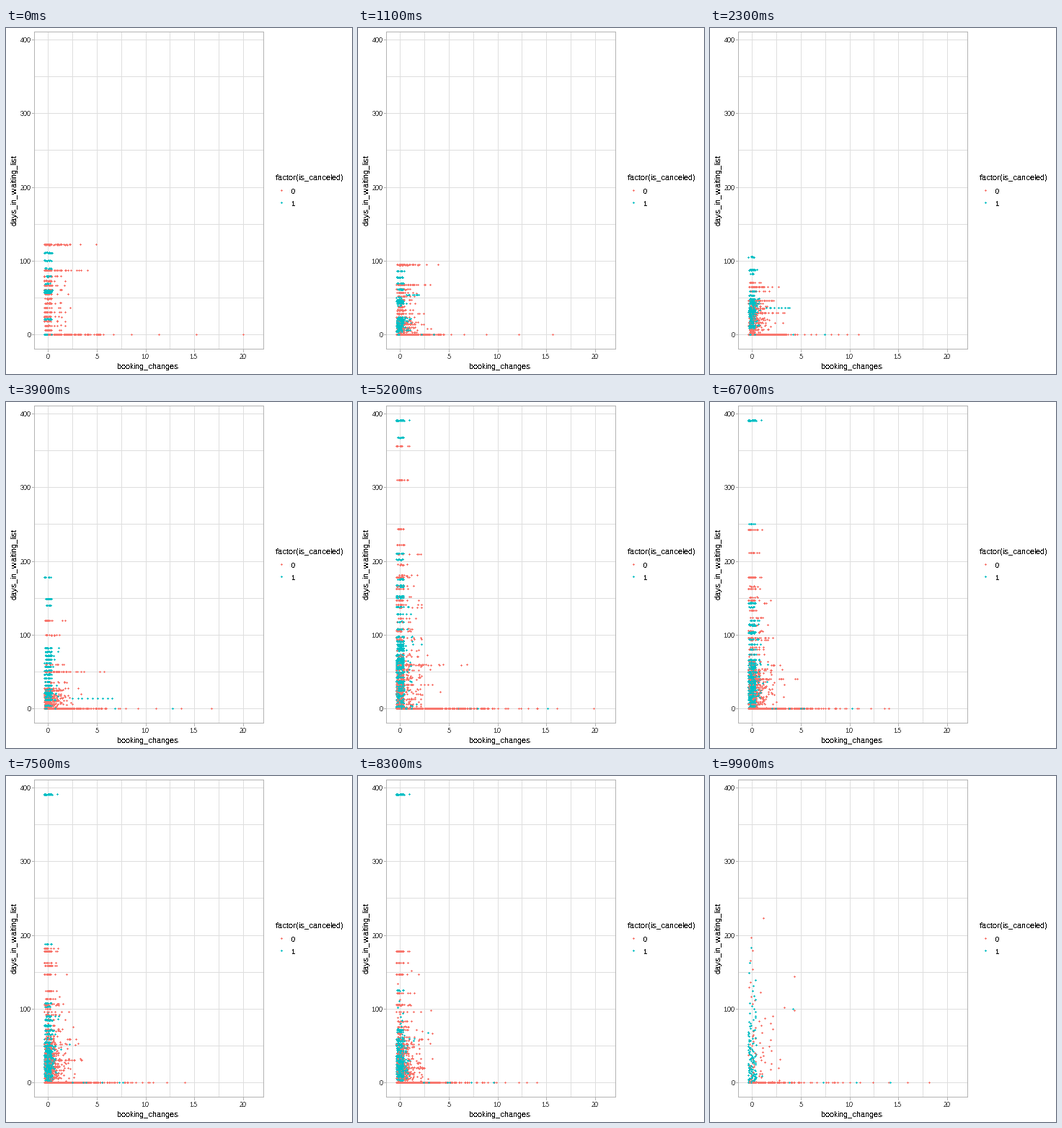
A matplotlib script that plays this animation: 480x480 px, repeating every 10 s.

```python
import numpy as np
import matplotlib.pyplot as plt
from matplotlib.animation import FuncAnimation

plt.rcParams.update({
    "font.family": "Liberation Sans",
    "text.antialiased": False,
    "text.hinting": "native",
    "text.hinting_factor": 1,
})

SIZE, FRAMES, MID = 480, 100, 49
LAST = FRAMES - 1
RED, BLUE = 0, 1
RGBA = np.array([[248, 118, 109, 255], [0, 191, 196, 255]], np.uint8)
X0, XS = 58.75, 13.53     # pixel of 0 changes, pixels per change
Y0, YS = 425.6, 1.0225    # pixel of 0 days, pixels per day
LEFT, RIGHT, TOP, BOTTOM = 39, 357, 5, 445

rng = np.random.default_rng(11)
span = np.linspace


# ---------- data: three yearly states, every point is (changes, days)

def points(days, spread, cap=4):
    """Jittered points; spread is the chance of each further booking change."""
    days = np.asarray(days, float)
    k = np.minimum(rng.geometric(1 - spread, len(days)) - 1, cap)
    return np.column_stack([k + rng.uniform(-.4, .4, len(days)),
                            days + rng.uniform(-.3, .3, len(days))])


def rows(days, n, spread=0., cap=4):
    """n points on each of the given waiting times."""
    return points(np.repeat(days, n), spread, cap)


def cloud(n, lo, hi, spread=0., levels=24):
    """Points on random waiting times, shared by groups of bookings."""
    return points(rng.choice(rng.uniform(lo, hi, levels).round(), n), spread)


def fading(n, mean, top, spread=0.):
    """Waiting times that get rarer upwards, thinning out at the top."""
    q = span(0, 1 - np.exp(-top / mean), n)
    return points(-mean * np.log(1 - q), spread)


def zeros(n, spread, cap, lo, hi, tail=7):
    """The zero line: a dense start and a tail that gets wider apart."""
    far = np.zeros((tail, 2))
    far[:, 0] = lo + (hi - lo) * span(0, 1, tail) ** 2.2
    return np.vstack([points(np.zeros(n), spread, cap), far])


def line_up(lo, hi, n):
    return np.column_stack([span(lo, hi, n), np.zeros(n)])


tracks = []


def add(color, a=None, b=None, c=None, first=0, last=LAST, z=0.):
    """Points through the three states; a missing state is near zero."""
    n = len(next(s for s in (a, b, c) if s is not None))
    spread = .2 if color == RED else .04
    a, b, c = (points(np.zeros(n), spread, 3) if s is None else s for s in (a, b, c))
    tracks.append((a, b, c, np.full(n, color), np.full(n, first),
                   np.full(n, last), z + rng.random(n)))


def add_late(color, b, **kw):
    add(color, b=b, first=MID, **kw)


def add_still(color, b, **kw):
    add(color, b, b, b, first=MID, last=LAST - 1, **kw)


# first state
add(RED, rows(span(6, 79, 13), 20, .18, 2))
add(RED, rows([87, 122], 55, .42, 5))
add(BLUE, rows(span(79, 111, 4), 14), z=.3)
add(BLUE, rows([21, 57, 58, 60], 26), z=.3)
add(BLUE, rows([69], 9), line_up(3.2, 8.3, 9), z=.3)
add(RED, zeros(420, .52, 5, 5.4, 20), z=2)

# middle state, reached from the first one
add(BLUE, b=rows([176, 187, 224], 9), z=.2)
add(BLUE, b=rows([187], 10), z=.2)
add(BLUE, b=rows(span(20, 103, 14), 22, .02), z=.2)
add(RED, b=rows([75, 125, 150], 14, .35, 2))
add(RED, b=rows([63], 60, .6, 7))
add(RED, b=rows(span(14, 45, 4), 18, .35))
add(RED, b=zeros(330, .62, 7, 9, 21.1), z=2)
add(BLUE, b=line_up(8.5, 16.1, 2), z=3)

# middle state, appearing there
add_late(BLUE, rows([391, 215, 224], 8), z=.2)
add_late(BLUE, rows([160, 162, 178], 18), z=.2)
add_late(BLUE, rows(span(93, 147, 6), 12, .04), z=.2)
add_late(BLUE, cloud(220, 12, 98, .02), z=.2)
add_late(RED, rows([236, 259, 330, 379], 15, .1, 1))
add_late(RED, rows(span(84, 223, 10), 10, .3, 2))
add_late(RED, cloud(130, 8, 80, .25))
add_late(RED, zeros(260, .64, 9, 9.5, 15), z=2)

# middle state, without a partner in the last one
add_still(BLUE, rows([391], 30, .14, 2))
add_still(BLUE, cloud(190, 8, 62, .02))
add_still(RED, rows(span(147, 178, 3), 20, .17, 2))
add_still(RED, rows([96, 105], 10, .2, 3))
add_still(RED, rows(span(6, 59, 9), 18, .25), z=.2)
add_still(RED, zeros(300, .57, 8, 8.5, 14), z=2)

# last state
add(RED, c=fading(75, 60, 223, .48))
add(BLUE, c=fading(125, 42, 183, .01), z=.2)
add(BLUE, c=np.array([[4.2, 100]]))
add(RED, c=zeros(130, .64, 8, 8.4, 18.2, 10), z=2)
add(BLUE, c=line_up(3.8, 14.2, 4), z=3)

A, B, C, color, first, last, z = (np.concatenate(t) for t in zip(*tracks))
order = np.argsort(z)
A, B, C, color, first, last = (v[order] for v in (A, B, C, color, first, last))


# ---------- stage

fig = plt.figure(figsize=(SIZE / 72, SIZE / 72), dpi=72, facecolor="white")
ax = fig.add_axes([0, 0, 1, 1])
ax.set(xlim=(0, SIZE), ylim=(SIZE, 0))
ax.axis("off")


def line(x, y, col):
    """One-pixel line; the offset keeps snapping on the named pixels."""
    ax.plot(np.add(x, .4), np.add(y, .4), color=col, lw=1,
            antialiased=False, solid_capstyle="butt")


def label(x, y, s, size=11, col="black", **kw):
    kw = {"ha": "center", "va": "baseline", **kw}
    ax.text(x, y, s, fontsize=size, color=col, **kw)


GRID, EDGE, TICK = "#DEDEDE", "#B3B3B3", "#4D4D4D"
for i in range(9):
    x = int(X0 + 2.5 * i * XS)
    y = int(Y0 - 50 * i * YS)
    line([x, x], [TOP, BOTTOM], GRID)
    line([LEFT, RIGHT], [y, y], GRID)
    if i % 2 == 0:
        line([x, x], [BOTTOM + 1, BOTTOM + 4], EDGE)
        line([LEFT - 3, LEFT], [y, y], EDGE)
        label(x - .3, 459, f"{5 * i // 2}", 9, TICK)
        label(34.5, y + 4, f"{50 * i}", 9, TICK, ha="right")

line([LEFT, RIGHT, RIGHT, LEFT, LEFT], [TOP, TOP, BOTTOM, BOTTOM, TOP], EDGE)

label(197, 473, "booking_changes")
label(12, 225.5, "days_in_waiting_list", rotation=90, va="center")
label(374, 211, "factor(is_canceled)", ha="left")
for i in (RED, BLUE):
    label(396, 230 + 17 * i, str(i), 9, ha="left")


# ---------- points

DX = np.array([0, -1, 1, 0, 0])
DY = np.array([0, 0, 0, -1, 1])


def stamp(buf, px, py, col):
    """Paint a small three-pixel dot at every position, later ones on top."""
    buf[(py[:, None] + DY).ravel(), (px[:, None] + DX).ravel()] = np.repeat(RGBA[col], 5, axis=0)


def picture(i):
    if i <= MID:
        pos = A + (B - A) * i / MID
    else:
        pos = B + (C - B) * (i - MID) / (LAST - MID)
    on = (first <= i) & (i <= last)
    px = np.floor(X0 + XS * pos[on, 0]).astype(int)
    py = np.floor(Y0 - YS * pos[on, 1]).astype(int)
    buf = np.zeros((SIZE, SIZE, 4), np.uint8)
    stamp(buf, px, py, color[on])
    stamp(buf, np.array([382, 382]), np.array([225, 242]), np.array([RED, BLUE]))
    return buf


dots = fig.figimage(picture(0), origin="upper", zorder=5)


def update(i):
    dots.set_data(picture(i))
    return [dots]


anim = FuncAnimation(fig, update, frames=FRAMES, interval=100,
                     repeat=True, repeat_delay=0, blit=False)
plt.show()
```
